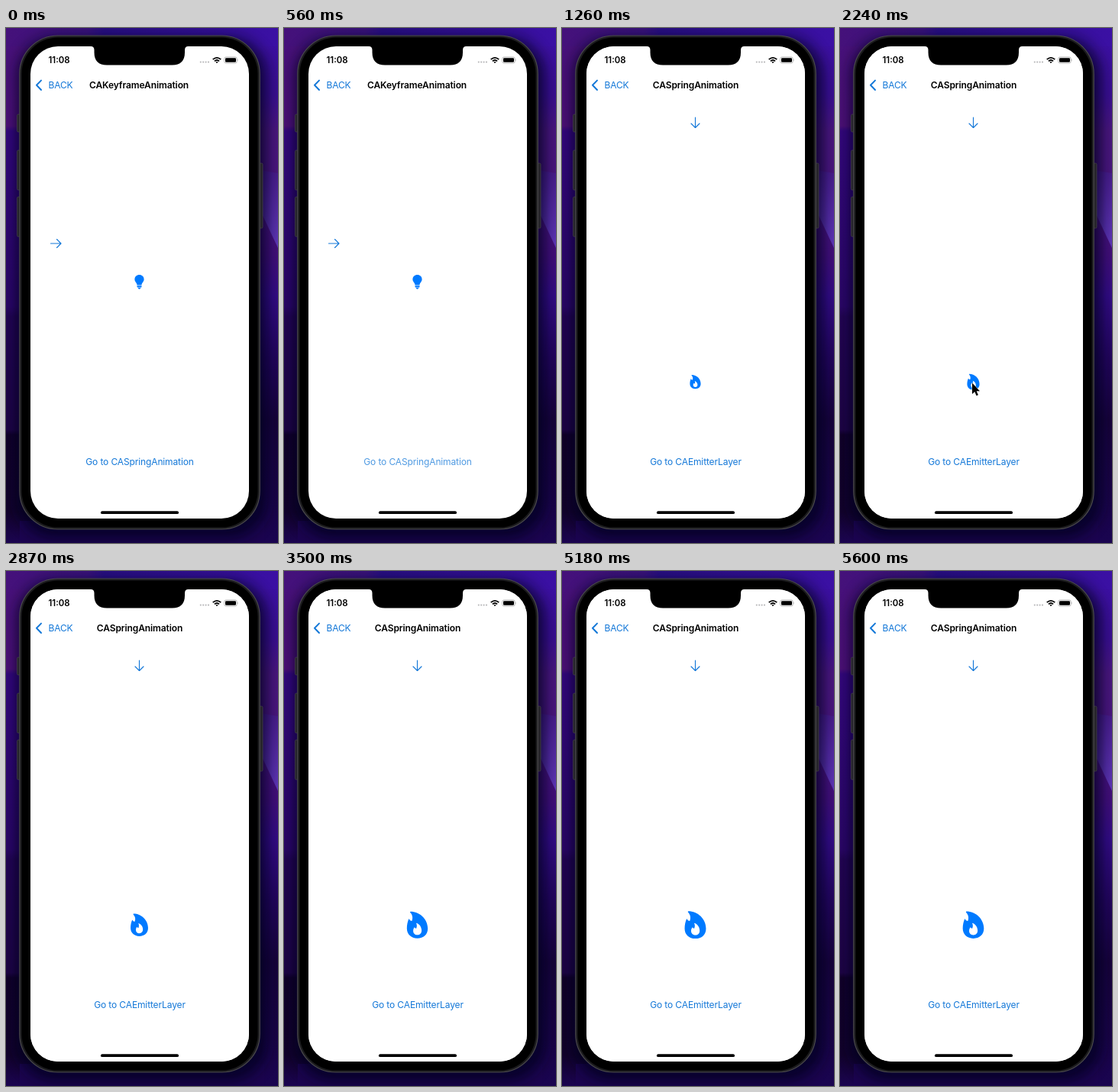
Write an HTML page that moves like this. It is 356 px wide and 674 px high and loops after 5.67 s.

```html
<!DOCTYPE html>
<html lang="en">
<head>
<meta charset="utf-8">
<title>Spring animation demo</title>
<style>
html, body { margin: 0; width: 100%; height: 100%; overflow: hidden; background: #160340; }
svg { display: block; width: 100%; height: 100%; }
text { font: 400 12px Inter, "Liberation Sans", sans-serif; letter-spacing: -.13px; fill: #1478d8; }
.title { font-weight: 600; fill: #000; letter-spacing: -.1px; }
.time { font-weight: 600; font-size: 11.4px; fill: #000; letter-spacing: 0; }
.mid { text-anchor: middle; }
.line { fill: none; stroke: #1478d8; stroke-width: 1.15; stroke-linecap: round; stroke-linejoin: round; }
.icon { fill: #007aff; }
</style>
</head>
<body>
<svg viewBox="0 0 356 674">
  <defs>
    <linearGradient id="top">
      <stop offset="0" stop-color="#45117a"/>
      <stop offset=".3" stop-color="#3a137e"/>
      <stop offset=".36" stop-color="#290f86"/>
      <stop offset="1" stop-color="#3b10a4"/>
    </linearGradient>
    <linearGradient id="left" x2="0" y2="1">
      <stop offset="0" stop-color="#45117a"/>
      <stop offset=".19" stop-color="#4c1078"/>
      <stop offset=".2" stop-color="#33077e"/>
      <stop offset=".54" stop-color="#2a0668"/>
      <stop offset=".56" stop-color="#220454"/>
      <stop offset=".78" stop-color="#1d0446"/>
      <stop offset=".79" stop-color="#10012a"/>
      <stop offset=".94" stop-color="#11022c"/>
      <stop offset="1" stop-color="#1b0450"/>
    </linearGradient>
    <linearGradient id="right" x2="0" y2="1">
      <stop offset="0" stop-color="#3b10a4"/>
      <stop offset=".13" stop-color="#3a0f94"/>
      <stop offset=".2" stop-color="#4a1780"/>
      <stop offset=".33" stop-color="#4a1680"/>
      <stop offset=".44" stop-color="#420f7c"/>
      <stop offset=".52" stop-color="#330c88"/>
      <stop offset=".64" stop-color="#22055e"/>
      <stop offset=".76" stop-color="#16033c"/>
      <stop offset="1" stop-color="#1a0450"/>
    </linearGradient>
    <linearGradient id="beam" x2="0" y2="1">
      <stop offset="0" stop-color="#471c8c"/>
      <stop offset="1" stop-color="#6038bc"/>
    </linearGradient>
    <filter id="blur" x="-20%" y="-20%" width="140%" height="140%"><feGaussianBlur stdDeviation="9"/></filter>
    <clipPath id="screen"><rect x="32" y="24" width="286" height="618" rx="36"/></clipPath>
  </defs>

  <rect width="178" height="674" fill="url(#left)"/>
  <rect x="178" width="178" height="674" fill="url(#right)"/>
  <path d="M0 0H356V24H0z" fill="url(#top)"/>
  <path d="M326 185L356 190V288L326 224z" fill="url(#beam)"/>
  <path d="M18 645H338V674H18z" fill="#1b0450"/>
  <rect x="14" y="12" width="328" height="656" rx="50" fill="#06001a" opacity=".75" filter="url(#blur)"/>

  <g fill="#25242a" stroke="#4a484c" stroke-width=".6">
    <rect x="14.5" y="113" width="5" height="23" rx="1.5"/>
    <rect x="14.5" y="160" width="5" height="52" rx="1.5"/>
    <rect x="14.5" y="221" width="5" height="52" rx="1.5"/>
    <rect x="331" y="177" width="5" height="85" rx="1.5"/>
  </g>
  <rect x="17.8" y="10" width="314.4" height="646" rx="50" fill="#1c1c1e" stroke="#4b4a4c" stroke-width="1.2"/>
  <rect x="20.5" y="12.5" width="309" height="641" rx="47.5"/>

  <g clip-path="url(#screen)">
    <rect x="32" y="24" width="286" height="618" fill="#fff"/>
    <g id="oldPage">
      <path class="line" d="M58.5 282H72M66.5 276.5L72 282L66.5 287.5"/>
      <path class="icon" d="M174.500 323C178 323 180.600 325.600 180.600 328.900C180.600 332 177.800 333 177.500 336.400H171.500C171.200 333 168.400 332 168.400 328.900C168.400 325.600 171 323 174.500 323z"/>
      <path class="icon" d="M171.500 337.200H177.500V338.800Q177.500 339.500 176.800 339.500H172.200Q171.500 339.500 171.500 338.800zM172.600 340.100H176.400Q176 341.800 174.500 341.800T172.600 340.100z"/>
      <text id="oldLink" class="mid" x="175" y="572.400">Go to CASpringAnimation</text>
    </g>
    <rect id="dim" x="32" y="24" width="286" height="618"/>
    <g id="newPage">
      <rect x="32" y="24" width="286" height="618" fill="#fff"/>
      <path class="line" d="M174.500 117V130.500M169 125L174.500 130.500L180 125"/>
      <text class="mid" x="175" y="572.400">Go to CAEmitterLayer</text>
      <g id="flame">
        <path class="icon" d="M-4.600 -9.100C1.600 -9.100 7.100 -4 7.100 2.400C7.100 6.600 4.200 9.100 0 9.100C-4.200 9.100 -7.100 6.400 -7.100 2.400C-7.100 0 -6.600 -2.400 -5.700 -4.200C-5.200 -3.200 -4.600 -2.700 -3.700 -2.700C-2.900 -4.600 -3.200 -6.800 -4.900 -8.500Q-5.100 -9.100 -4.600 -9.100z"/>
        <path fill="#fff" d="M-.5 -1.300C1.800 -.4 2.900 1.800 2.900 3.800C2.900 5.700 1.700 6.800 0 6.800C-1.700 6.800 -2.800 5.600 -2.800 4C-2.800 3 -2.400 2.100 -1.900 1.600C-1.600 2.200 -1.200 2.400 -.7 2.300C-.2 1.200 -.2 -.1 -.7 -1Q-.8 -1.300 -.5 -1.300z"/>
      </g>
    </g>

    <path class="line" style="stroke-width:2" d="M46 68.600L40 74.800L46 81"/>
    <text id="oldBack" x="55.500" y="79">BACK</text>
    <text id="oldTitle" class="title" x="109" y="79">CAKeyframeAnimation</text>
    <text id="newBack" x="55.500" y="79">BACK</text>
    <text id="newTitle" class="title mid" x="175" y="79">CASpringAnimation</text>

    <text class="time" x="55.500" y="46.300">11:08</text>
    <g fill="#b9b9bb">
      <circle cx="254.800" cy="44.600" r="1.100"/><circle cx="258.200" cy="44.600" r="1.100"/>
      <circle cx="261.600" cy="44.600" r="1.100"/><circle cx="265" cy="44.600" r="1.100"/>
    </g>
    <g fill="none" stroke="#000" stroke-width="1.700">
      <path d="M270.700 41.200Q276 36.400 281.300 41.200M272.900 43.400Q276 40.600 279.100 43.400"/>
      <path d="M274.400 44.600Q276 43.400 277.600 44.600L276 46.300z" fill="#000" stroke="none"/>
    </g>
    <rect x="285.700" y="37.900" width="16.600" height="8.200" rx="2.500" fill="none" stroke="#aaa" stroke-width=".8"/>
    <rect x="287" y="39.200" width="14" height="5.600" rx="1.400"/>
    <path d="M303.200 40.500Q304.600 42 303.200 43.500z" fill="#aaa"/>
    <rect x="124" y="632.300" width="102" height="3.700" rx="1.850"/>
  </g>
  <path d="M111 23V24Q115.500 24 115.500 29V32Q115.500 48.500 132 48.500H217.500Q234 48.500 234 32V29Q234 24 238.500 24V23z"/>
  <path id="cursor" d="M173 464.500V479L176.300 476L178.500 481.200L180.900 480.200L178.700 475.200H183z" stroke="#fff" stroke-width=".9" stroke-linejoin="round" paint-order="stroke"/>
</svg>
<script>
const LOOP = 5670, STEP = 70, WIDTH = 286;
const el = id => document.getElementById(id);
const slide = (id, x, opacity = 1) => {
  el(id).setAttribute('transform', `translate(${x} 0)`);
  el(id).setAttribute('opacity', opacity);
};

// Share of the push transition still to go, 1 to 0.
function remaining(t) {
  if (t < 700) return 1;
  if (t >= 1260) return 0;
  const x = (t - 655) * .0174;
  return (1 + x) * Math.exp(-x);
}

// Underdamped spring from 1 towards 1.94.
function flameScale(t) {
  const s = Math.max(0, t - 1880) / 1000, a = 1.1, b = 1.35;
  return 1 + .94 * (1 - Math.exp(-a * s) * (Math.cos(b * s) + a / b * Math.sin(b * s)));
}

function draw(t) {
  const r = remaining(t), done = 1 - r;
  slide('oldPage', -.3 * WIDTH * done);
  slide('newPage', WIDTH * r);
  slide('dim', 0, r ? .107 * done : 0);
  slide('oldBack', -53.5 * done, Math.max(0, 2 * r - 1));
  slide('oldTitle', -53.5 * done, Math.min(1, 1.5 * r));
  slide('newBack', 53.5 * r, done);
  slide('newTitle', 175 * r, done);
  el('oldLink').setAttribute('opacity', t >= 560 && t < 700 ? .75 : 1);
  el('flame').setAttribute('transform', `translate(174.5 463.2) scale(${flameScale(t)})`);
  el('cursor').setAttribute('opacity', t >= 1820 && t < 2380 ? 1 : 0);
}

const start = performance.now();
function tick() {
  const t = (performance.now() - start) % LOOP;
  draw(Math.floor(t / STEP) * STEP);
  requestAnimationFrame(tick);
}
tick();
</script>
</body>
</html>
```
